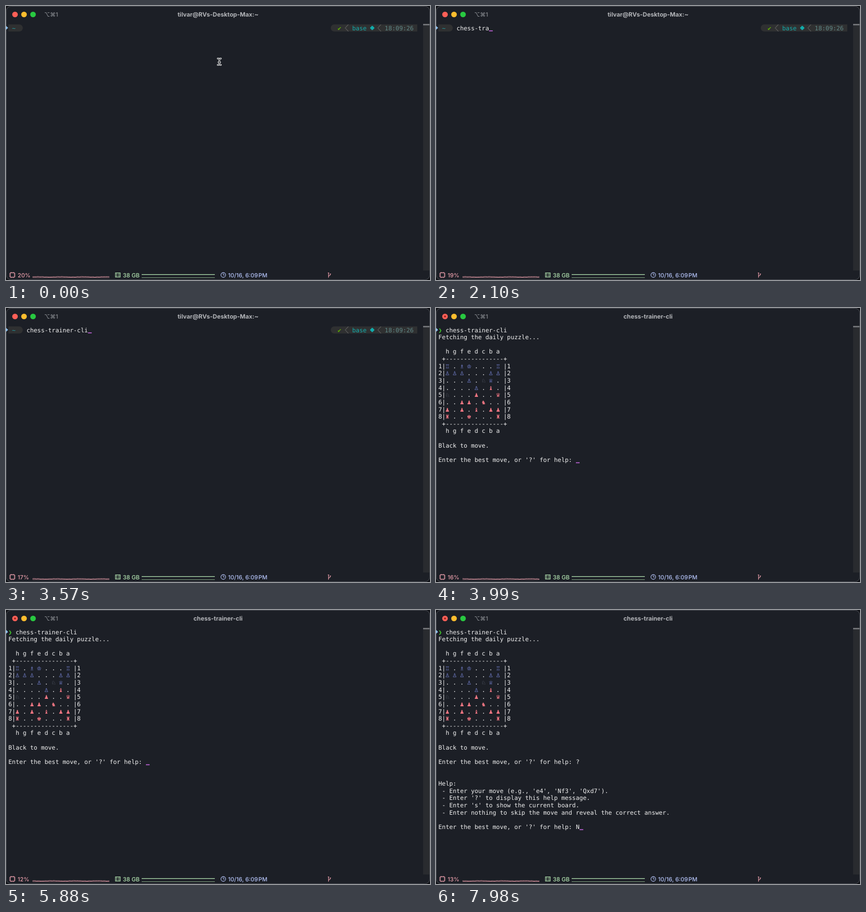
Recreate the animation shown at these times as an HTML page. Size 800x518 px, loop 8000 ms.

```html
<!DOCTYPE html>
<html lang="en">
<head>
<meta charset="utf-8">
<title>Terminal</title>
<style>
  html, body { margin: 0; width: 100%; height: 100%; overflow: hidden; background: #1c1f26; }
  svg { display: block; width: 100%; height: 100%; }
  text { white-space: pre; text-rendering: geometricPrecision; }
  .mono text { font: 11.34px "DejaVu Sans Mono", monospace; fill: #f1f1f1; }
  .mono .piece { font: 10px "DejaVu Sans", sans-serif; text-anchor: middle; }
  .ui text { font: 500 10.8px Inter, sans-serif; }
  .ui .title { font-weight: 700; font-size: 11.3px; text-anchor: middle; fill: #b3b5b9; }
  .line { fill: none; stroke: currentColor; }
</style>
</head>
<body>
<svg viewBox="0 0 800 518">
  <rect width="800" height="518" fill="#101217"/>
  <rect x=".5" y=".5" width="799" height="517" rx="9" fill="#1c1f26" stroke="#4c4f55"/>
  <rect x="787" y="33" width="12" height="467" fill="#292b2f"/>
  <rect x="787" y="34" width="12" height="2.500" fill="#77797e"/>

  <g class="ui">
    <circle cx="17" cy="16" r="5.3" fill="#ff5f57"/>
    <circle cx="34" cy="16" r="5.3" fill="#febc2e"/>
    <circle cx="51" cy="16" r="5.3" fill="#28c840"/>
    <circle id="busy" cx="17" cy="16" r="1.7" fill="#8c1a10"/>
    <text x="72" y="20" fill="#898c91" style="font-family:Inter,'DejaVu Sans',sans-serif">⌥⌘1</text>
    <text id="title" class="title" x="400" y="20"></text>

    <g color="#eba0ac">
      <path class="line" stroke-width="1.2" d="M8 504.500h8v8h-8z"/>
      <path class="line" d="M9.500 502.800v1.200m2.500-1.200v1.200m2.500-1.200v1.200M9.500 513v1.200m2.500-1.200v1.200m2.500-1.200v1.200M6.300 506h1.200m-1.200 2.500h1.200m-1.200 2.500h1.200m9-5h1.200m-1.200 2.500h1.200m-1.200 2.500h1.200"/>
      <text id="cpu" x="22" y="512.500" fill="currentColor"></text>
      <path class="line" d="M50 513.500H195" opacity=".6"/>
      <path id="graph" class="line" stroke-width=".9"/>
      <path class="line" stroke-width="1.1" d="M608.500 504v9.500M608.500 510.500q3.500-.5 3.500-4M610.800 506.500h2.400M607.300 504.500h2.400"/>
    </g>
    <g color="#b2e2b0">
      <path class="line" stroke-width="1.1" d="M206.500 504.500h9v8h-9zM209 504.500v8M213 504.500v8"/>
      <text x="220.500" y="512.500" fill="currentColor">38 GB</text>
      <path class="line" stroke-width="1.2" d="M256 507.600H394"/>
      <path class="line" d="M256 513.500H394" opacity=".65"/>
    </g>
    <g color="#b4c3f7">
      <circle class="line" cx="410" cy="508.500" r="4.400" stroke-width="1.1"/>
      <path class="line" d="M410 505.500v3.200h2.400"/>
      <text x="419" y="512.500" fill="currentColor">10/16, 6:09&#8202;PM</text>
    </g>
  </g>

  <path d="M0 37.500L4 41.300L0 45z" fill="#8fc1ee"/>
  <g id="shell" class="mono">
    <path d="M4.500 34.700H25a6.800 6.800 0 0 1 0 13.600H4.500z" fill="#2f3031"/>
    <path d="M776 34.700H619.500a6.800 6.800 0 0 0 0 13.600H776z" fill="#2f3031"/>
    <path class="line" color="#707070" d="M646 35l-6 6.500l6 6.500M707.500 35l-6 6.500l6 6.500"/>
    <g fill="#12adad">
      <circle cx="691" cy="39.600" r="2"/><circle cx="691" cy="43.400" r="2"/>
      <circle cx="689" cy="41.500" r="2"/><circle cx="693" cy="41.500" r="2"/>
    </g>
  </g>
  <g id="app" class="mono"></g>
  <g id="board" class="mono"></g>
  <g id="help" class="mono"></g>
  <rect id="cursor" width="7" height="1.600" fill="#c264dc"/>
  <g id="mouse" fill="none" stroke-linecap="round" transform="translate(402.500 105.300)">
    <path stroke="#eee" stroke-width="3" d="M-3-6q2.500 0 3 2q.5-2 3-2M0-4v8M-3 6q2.500 0 3-2q.5 2 3 2M-1.500 1h3"/>
    <path stroke="#15171c" d="M-3-6q2.500 0 3 2q.5-2 3-2M0-4v8M-3 6q2.500 0 3-2q.5 2 3 2M-1.500 1h3"/>
  </g>
</svg>
<script>
const LOOP = 8000, CELL = 6.828, ROW = 13.64;
const $ = id => document.getElementById(id);
const colX = c => 4.5 + c * CELL;
const rowY = r => 45.5 + r * ROW;

function put(group, col, row, str, color, cls) {
  const el = document.createElementNS("http://www.w3.org/2000/svg", "text");
  el.setAttribute("x", colX(col));
  el.setAttribute("y", rowY(row));
  if (color) el.style.fill = color;
  if (cls) el.setAttribute("class", cls);
  el.textContent = str;
  $(group).append(el);
  return el;
}

// Shell prompt
put("shell", 1, 0, "~", "#239da4");
put("shell", 91, 0, "✔", "#5faf00");
put("shell", 95, 0, "base", "#12adad");
put("shell", 104, 0, "18:09:26", "#5f8787");
const command = "chess-trainer-cli";
const typed = put("shell", 5, 0, "");

// Program output
const ask = "Enter the best move, or '?' for help: ";
put("app", 0, 0, "❯", "#43d32c");
put("app", 2, 0, command);
put("app", 0, 1, "Fetching the daily puzzle...");

const files = "  h g f e d c b a", edge = " +----------------+";
put("board", 0, 3, files);
put("board", 0, 4, edge);
put("board", 0, 13, edge);
put("board", 0, 14, files);
["♖.♗♔...♖", "♙♙♙...♙♙", "...♙.♘♕.", "....♙.♝.",
 "♘...♟..♛", "..♟♟.♞..", "♟.♟.♝.♟♟", "♜..♚...♜"].forEach((rank, i) => {
  const dots = [...rank].map(p => p === "." ? ". " : "  ").join("");
  put("board", 0, 5 + i, `${i + 1}|${dots}|${i + 1}`);
  [...rank].forEach((p, j) => {
    if (p === ".") return;
    const color = p === "♘" ? "#6a7182" : p < "♚" ? "#7f8de4" : "#f27783";
    put("board", 2.5 + 2 * j, 5 + i, p, color, "piece");
  });
});
put("board", 0, 16, "Black to move.");
put("board", 0, 18, ask);
const firstReply = put("board", ask.length, 18, "");

["Help:",
 " - Enter your move (e.g., 'e4', 'Nf3', 'Qxd7').",
 " - Enter '?' to display this help message.",
 " - Enter 's' to show the current board.",
 " - Enter nothing to skip the move and reveal the correct answer.",
 "", ask].forEach((line, i) => put("help", 0, 21 + i, line));
const secondReply = put("help", ask.length, 27, "");

const show = (id, on) => $(id).style.display = on ? "" : "none";
const load = [20, 21, 19, 17, 16, 14, 12, 12, 13];
const RUN = 3600, BOARD = 3850, QUERY = 6090, HELP = 6370, MOVE = 7490;

function draw(t) {
  const running = t >= RUN, ready = t >= BOARD, helped = t >= HELP;
  const count = Math.max(0, Math.min(command.length, Math.floor((t - 315) / 185)));
  typed.textContent = command.slice(0, count);
  firstReply.textContent = t >= QUERY ? "?" : "";
  secondReply.textContent = t >= MOVE ? "N" : "";

  show("shell", !running);
  show("app", running);
  show("board", ready);
  show("help", helped);
  show("busy", running);
  show("mouse", count === 0);
  show("cursor", t >= 400);
  $("title").textContent = running ? command : "tilvar@RVs-Desktop-Max:~";

  let col = 5 + count, row = 0;
  if (helped) { col = ask.length + (t >= MOVE); row = 27; }
  else if (ready) { col = ask.length + (t >= QUERY); row = 18; }
  else if (running) { col = 0; row = 2; }
  $("cursor").setAttribute("x", colX(col));
  $("cursor").setAttribute("y", rowY(row) + 0.7);

  // The load meter refreshes once a second
  const tick = Math.floor((t + 270) / 1000);
  $("cpu").textContent = load[tick] + "%";
  let d = "";
  for (let i = 0; i <= 58; i++) {
    const k = i + tick;
    const y = 511.9 - 0.35 * Math.sin(k * 0.37) - 0.3 * Math.sin(k * 1.9) * Math.sin(k * 0.23);
    d += (i ? "L" : "M") + (50 + i * 2.5) + " " + y.toFixed(2);
  }
  $("graph").setAttribute("d", d);
}

function frame(now) {
  draw(now % LOOP);
  requestAnimationFrame(frame);
}
draw(0);
requestAnimationFrame(frame);
</script>
</body>
</html>
```
